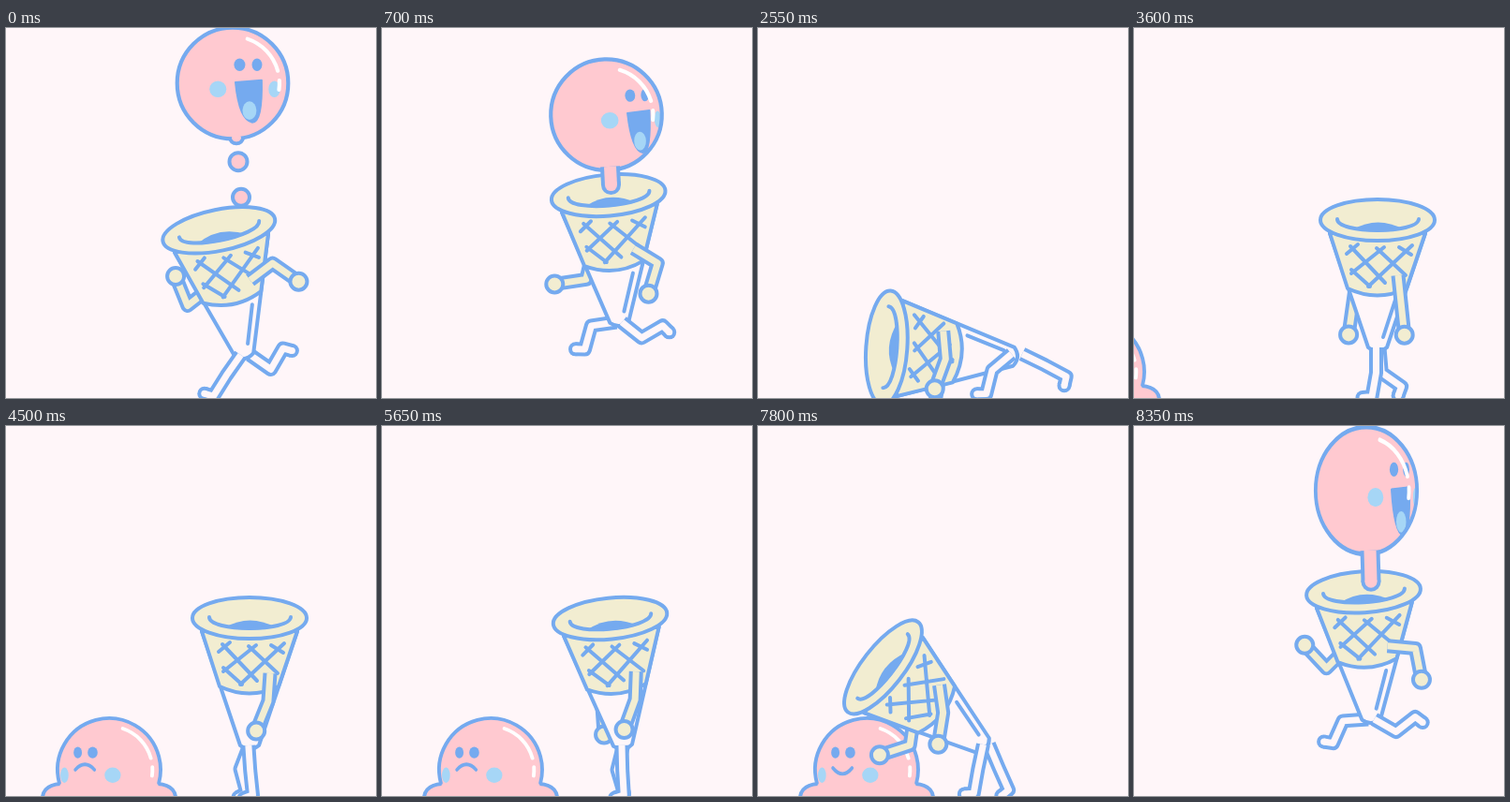
Animation of 395x395 px, one loop 8400 ms. Source, as an HTML page with a canvas:

```html
<!DOCTYPE html>
<html lang="en">
<head>
<meta charset="utf-8">
<title>Ice cream friends</title>
<style>
html, body { margin: 0; height: 100%; overflow: hidden; background: #fff6f9; }
canvas { display: block; }
</style>
</head>
<body>
<canvas id="stage" width="395" height="395"></canvas>
<script>
const g = document.getElementById('stage').getContext('2d');
const LOOP = 8400, FRAME = 50, STRIDE = 400;
const LINE = '#75aaef', CREAM = '#f2edd1', PINK = '#ffc9d0', SKY = '#a6d6f6', PAPER = '#fff6f9';
const RAD = Math.PI / 180, RIM = 139, RADIUS = 57;

const mix = (a, b, k) => Array.isArray(a) ? a.map((v, i) => mix(v, b[i], k)) : a + (b - a) * k;
const clamp = k => Math.min(1, Math.max(0, k));
const smooth = k => k * k * (3 - 2 * k);

function turn(x, y, deg) {
  const c = Math.cos(deg * RAD), s = Math.sin(deg * RAD);
  return [x * c - y * s, x * s + y * c];
}

// A pose is the cone tip (x, y), its tilt, then two joint angles for each limb:
// front arm, back arm, front leg, back leg. Angle 0 hangs down, positive swings right.
const contact = [255, 352, -11.5, 127, 55, -52, -158, -35, -32, 55, 150];
const air = [253.5, 316, -3.5, 85, 11, -45, -137, -86, -24, 60, 128];
const trip = [254, 311, -26, -17, -96, 77, 77, -70, 9, 27, 98];
const lying = [276, 351, -86, 5, -20, -10, -30, -50, -14, 64, 62];
const lean = [243, 343, -36.5, 8, -9, -8, -72, -12, -10, 23, 24];

const place = (pose, x, y, tilt) => [x, y, tilt, ...pose.slice(3)];
const swapLegs = pose => [...pose.slice(0, 7), ...pose.slice(9), ...pose.slice(7, 9)];

const walk = s => [260, 344, 0, 1 + 5 * s, -8 + 14 * s, 5 - 13 * s, 5 - 13 * s,
  2 - 2 * s, -2 - 8 * s, -8 + 13 * s, 35 + 20 * s];

function patting(t) {
  const lift = Math.sin(Math.PI * (t - 6300) / 225) ** 2;
  return lean.map((v, i) => v - (i === 5 ? 25 : i === 6 ? 15 : 0) * lift);
}

const stride = s => [
  [s, contact], [s + 200, swapLegs(place(trip, 254, 320, -9))],
  [s + 350, swapLegs(air)], [s + STRIDE, swapLegs(contact)]
];
const bow = place(lean, 243, 343, -52);
const keys = [
  ...[0, 400, 800].flatMap(stride),
  [1200, contact], [1400, swapLegs(trip)], [1500, swapLegs(trip)],
  [1900, lying], [2300, lying], [2420, place(lying, 276, 350, -85)], [2550, lying],
  [3000, walk(1)], [5450, walk(-1)], [6250, lean], [7400, lean], [7650, bow], [7800, bow],
  ...stride(8000)
];

function conePose(t) {
  if (t >= 3000 && t < 5450) return walk(Math.cos(Math.PI * (Math.min(t, 4500) - 3600) / 300));
  if (t >= 6300 && t < 7200) return patting(t);
  let i = 0;
  while (i < keys.length - 2 && keys[i + 1][0] <= t) i++;
  const [t0, from] = keys[i], [t1, to] = keys[i + 1];
  return mix(from, to, smooth(clamp((t - t0) / (t1 - t0))));
}

function ink(fill, width = 4) {
  if (fill) { g.fillStyle = fill; g.fill(); }
  if (width) { g.strokeStyle = LINE; g.lineWidth = width; g.stroke(); }
}
function oval(x, y, rx, ry, fill, width = 0) {
  g.beginPath();
  g.ellipse(x, y, rx, ry, 0, 0, 7);
  ink(fill, width);
}
function shape(d, fill, width = 4) {
  const path = new Path2D(d);
  if (fill) { g.fillStyle = fill; g.fill(path); }
  if (width) { g.strokeStyle = LINE; g.lineWidth = width; g.stroke(path); }
}
function within(x, y, deg, draw) {
  g.save();
  g.translate(x, y);
  g.rotate(deg * RAD);
  draw();
  g.restore();
}

// Outlined limb, open at its start and round at its end.
function tube(points, width, endRadius, fill) {
  const [ex, ey] = points[points.length - 1];
  g.lineCap = 'butt';
  for (const [grow, color] of [[2, LINE], [-2, fill]]) {
    g.beginPath();
    points.forEach(p => g.lineTo(...p));
    g.strokeStyle = color;
    g.lineWidth = width + grow * 2;
    g.stroke();
    oval(ex, ey, endRadius + grow, endRadius + grow, color);
  }
  g.lineCap = 'round';
}

function chain(start, ...bones) {
  const points = [start];
  for (const [length, angle] of bones) {
    const [x, y] = points[points.length - 1], [dx, dy] = turn(0, length, -angle);
    points.push([x + dx, y + dy]);
  }
  return points;
}
function arm(side, tilt, upper, fore) {
  const points = chain(turn(22 * side, -80, tilt), [30, upper], [34, fore]);
  tube(points, 11, 5, CREAM);
  oval(...points[2], 9, 9, CREAM, 4);
}
function leg(side, thigh, shin) {
  const hip = [5 * Math.sin(thigh * RAD) - 1.5 * side, -3];
  tube(chain(hip, [27, thigh], [26, shin], [10, shin - 75]), 11, 5.5, PAPER);
}

function coneBody() {
  shape('M-51-125L-10-3Q0 5 10-3L51-125Z', PAPER);
  shape('M-51-125L-32-66Q0-51 31-66L51-125Z', CREAM);
  shape('M-29-111L8-72M7-110L-28-82M-1-109L30-80M37-112L-10-68' +
    'M23-110L36-102M-33-103L-21-113M-28-86L-8-68M19-54L6-14');
  oval(0, -RIM, 61, 22, CREAM, 4);
  shape('M-26-129Q0-144 28-129Q0-124-26-129Z', LINE, 0);
  shape('M-43-140C-43-124 43-124 44-140');
}

function cone([x, y, tilt, ...angles]) {
  within(x, y, 0, () => {
    leg(-1, ...angles.slice(6));
    arm(-1, tilt, ...angles.slice(2, 4));
    within(0, 0, tilt, coneBody);
    leg(1, ...angles.slice(4, 6));
    arm(1, tilt, ...angles.slice(0, 2));
  });
}

// Places a facial feature on the ball as it turns.
function feature(angle, y, draw) {
  g.save();
  g.translate(RADIUS * Math.sin(angle * RAD), y);
  g.scale(Math.max(.2, Math.cos(angle * RAD)), 1);
  draw();
  g.restore();
}

function face(yaw, mood) {
  for (const side of [-1, 1]) {
    feature(yaw + side * 32, 6, () => oval(0, 0, 9, 8.5, SKY));
    feature(yaw + side * 9.4, -19, () => oval(0, 0, 5.8, 6.4, LINE));
  }
  feature(yaw, 0, () => {
    if (mood === 'sad') shape('M-12 0Q0-12 12 0');
    else if (mood === 'smile') shape('M-12-2Q0 11 12-2');
    else {
      shape('M-14-1L14-3Q15 40 4 40Q-10 38-14-1Z', LINE, 2);
      oval(1, 28, 7.5, 9.5, SKY);
    }
  });
}

// The outline stops short of the bottom, at the given angle below the equator.
function ball(sx, sy, yaw, mood, end) {
  g.scale(sx, sy);
  oval(0, 0, RADIUS, RADIUS, PINK);
  g.save();
  g.clip();
  face(yaw, mood);
  g.restore();
  g.beginPath();
  g.arc(0, 0, RADIUS, (180 - end) * RAD, (360 + end) * RAD);
  ink(null);
  g.strokeStyle = '#fff';
  for (const [from, to] of [[-1.25, -.27], [-.06, .14]]) {
    g.beginPath();
    g.arc(0, 0, 48, from, to);
    g.stroke();
  }
}

function groundScoop(t) {
  const left = Math.max(0, (4700 - t) / 1100);
  within(116 - 160 * left ** 1.93, 367, 0, () => {
    shape('M-52 15C-66 16-74 23-70 38H70C74 23 66 16 52 15Z', PINK);
    ball(.965, .965, -28, t < 6350 ? 'sad' : 'smile', 15);
  });
  if (t >= 5100 && t < 5300) oval(97, 352 + (t - 5100) * .21, 4, 5, SKY);
}

function looseScoop(t) {
  let x, y;
  if (t < 7800) {
    const k = (t - 1450) / 400;
    [x, y] = [172 - 250 * k, 128 + 290 * k * k];
  } else {
    const k = (t - 7800) / 200;
    [x, y] = [mix(116, 242, smooth(k)), 367 - 308 * Math.sin(k * Math.PI / 2)];
  }
  within(x, y, 0, () => ball(1, 1, t < 7800 ? -43 : mix(-28, 17, (t - 7800) / 200), 'happy', 90));
}

// The scoop floats up as the cone drops, pulling a neck that breaks into drops.
function bouncingScoop(t, [cx, cy, tilt]) {
  const phase = t % STRIDE / STRIDE;
  const lift = smooth(clamp((Math.abs(2 * phase - 1) - .3) / .45));
  const stretch = Math.max(0, 1 - Math.abs(phase - .875) / .12);
  const sx = 1.04 - .09 * stretch, sy = 1.04 + .15 * stretch;
  const yaw = 46 * Math.cos(2 * Math.PI * (phase + .16)) + .7 * tilt;
  const [rx, ry] = turn(0, -RIM, tilt), [ux, uy] = turn(0, -62, tilt * .75);
  const rimY = cy + ry;
  const x = mix(cx + rx + ux, 242 + 6 * stretch, lift);
  const y = mix(rimY + uy, 59 + 10 * stretch, lift);
  const bottom = y + RADIUS * sy, gap = rimY - bottom;
  const seated = gap < 14, dripping = gap >= 60;

  if (seated) within(cx, cy, tilt, () =>
    shape('M-36-160C-62-158-60-145-46-138Q0-117 46-138C60-146 58-156 40-160', PINK));
  if (dripping) oval(x + 4, bottom - 1, 7, 6, PINK, 4);
  within(x, y, tilt * .6 * (1 - lift), () => ball(sx, sy, yaw, 'happy', seated ? 48 : 90));
  if (seated) {
    within(cx, cy, tilt, () => shape('M-23-149Q-1-139 17-144'));
  } else if (dripping) {
    oval(x + 4, bottom - 1, 5, 4, PINK);
    oval(x + 6, bottom + gap * .25, 9.5, 9.5, PINK, 4);
    oval(x + 9, bottom + gap * .64, 9, 9, PINK, 4);
  } else {
    tube([[x + 4, bottom - 4], [x + 5, rimY - 11]], 17, 8.5, PINK);
  }
}

function draw(t) {
  g.fillStyle = PAPER;
  g.fillRect(0, 0, 395, 395);
  g.lineCap = g.lineJoin = 'round';
  const pose = conePose(t);
  if (t >= 3000 && t <= 7800) groundScoop(t);
  cone(pose);
  if (t < 1450 || t >= 8000) bouncingScoop(t, pose);
  else if (t < 1900 || t > 7800) looseScoop(t);
}

const start = performance.now();
function tick() {
  const t = (performance.now() - start) % LOOP;
  draw(Math.floor(t / FRAME) * FRAME);
  requestAnimationFrame(tick);
}
tick();
</script>
</body>
</html>
```
